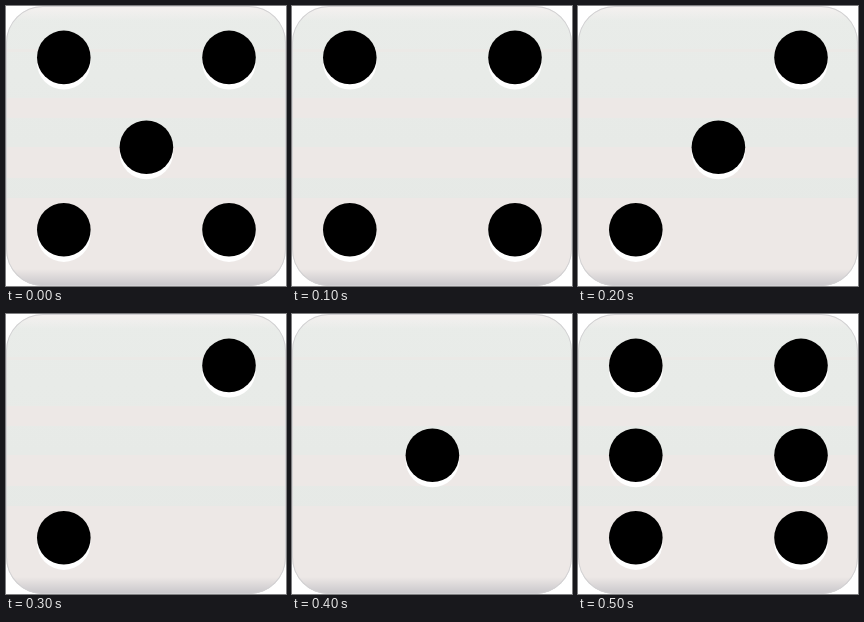
Recreate the animation shown at these times as an HTML page. Size 280 by 280 pixels, loop 0.6 s.

```html
<!DOCTYPE html>
<html lang="en">
<head>
<meta charset="utf-8">
<title>Die</title>
<style>
  html, body { margin: 0; width: 100%; height: 100%; overflow: hidden; background: #fff; }
  svg { display: block; width: 100vw; height: 100vh; }
</style>
</head>
<body>
<svg viewBox="0 0 280 280">
  <defs>
    <linearGradient id="body" x2="0" y2="1">
      <stop offset="0" stop-color="#e9ece9"/>
      <stop offset="1" stop-color="#e5e8e5"/>
    </linearGradient>
    <linearGradient id="shine" x2="0" y2="1">
      <stop offset="0" stop-color="#f5f1f0"/>
      <stop offset="1" stop-color="#f5f1f0" stop-opacity="0"/>
    </linearGradient>
    <linearGradient id="foot" x2="0" y2="1">
      <stop offset="0" stop-color="#c8c6ca" stop-opacity="0"/>
      <stop offset="1" stop-color="#c8c6ca"/>
    </linearGradient>
    <clipPath id="edge"><rect width="280" height="280" rx="37"/></clipPath>
    <g id="pip">
      <circle cy="5.3" r="26.8" fill="#fff"/>
      <circle r="26.8"/>
    </g>
  </defs>
  <g clip-path="url(#edge)">
    <rect width="280" height="280" fill="url(#body)"/>
    <g fill="#ede8e6" shape-rendering="crispEdges">
      <rect y="43" width="280" height="3" opacity=".7"/>
      <rect y="92" width="280" height="20"/>
      <rect y="141" width="280" height="31"/>
      <rect y="192" width="280" height="88"/>
    </g>
    <rect width="280" height="15" fill="url(#shine)"/>
    <rect y="263" width="280" height="17" fill="url(#foot)"/>
    <rect width="280" height="280" rx="37" fill="none" stroke="#d2d1d3" stroke-width="2"/>
  </g>
  <g id="pips"></g>
</svg>
<script>
const STEP = 100, SIDES = 6;
const LEFT = 57.8, RIGHT = 223, TOP = 51.4, BOTTOM = 223.8;
const MID_X = (LEFT + RIGHT) / 2, MID_Y = 141.2;

// Which pips show on a face with n dots
const spots = [
  { x: RIGHT, y: TOP, on: n => n > 1 },
  { x: LEFT, y: BOTTOM, on: n => n > 1 },
  { x: LEFT, y: TOP, on: n => n > 3 },
  { x: RIGHT, y: BOTTOM, on: n => n > 3 },
  { x: MID_X, y: MID_Y, on: n => n % 2 === 1 },
  { x: LEFT, y: MID_Y, on: n => n === 6 },
  { x: RIGHT, y: MID_Y, on: n => n === 6 }
];

const layer = document.getElementById("pips");
for (const spot of spots) {
  spot.el = document.createElementNS("http://www.w3.org/2000/svg", "use");
  spot.el.setAttribute("href", "#pip");
  spot.el.setAttribute("transform", `translate(${spot.x} ${spot.y})`);
  layer.append(spot.el);
}

const start = performance.now();
function draw(now) {
  const turn = Math.floor(Math.max(0, now - start) / STEP) % SIDES;
  // Counts down from 5 to 1, then wraps to 6
  const n = (SIDES + 4 - turn) % SIDES + 1;
  for (const { el, on } of spots) el.setAttribute("visibility", on(n) ? "visible" : "hidden");
  requestAnimationFrame(draw);
}
draw(start);
</script>
</body>
</html>
```
